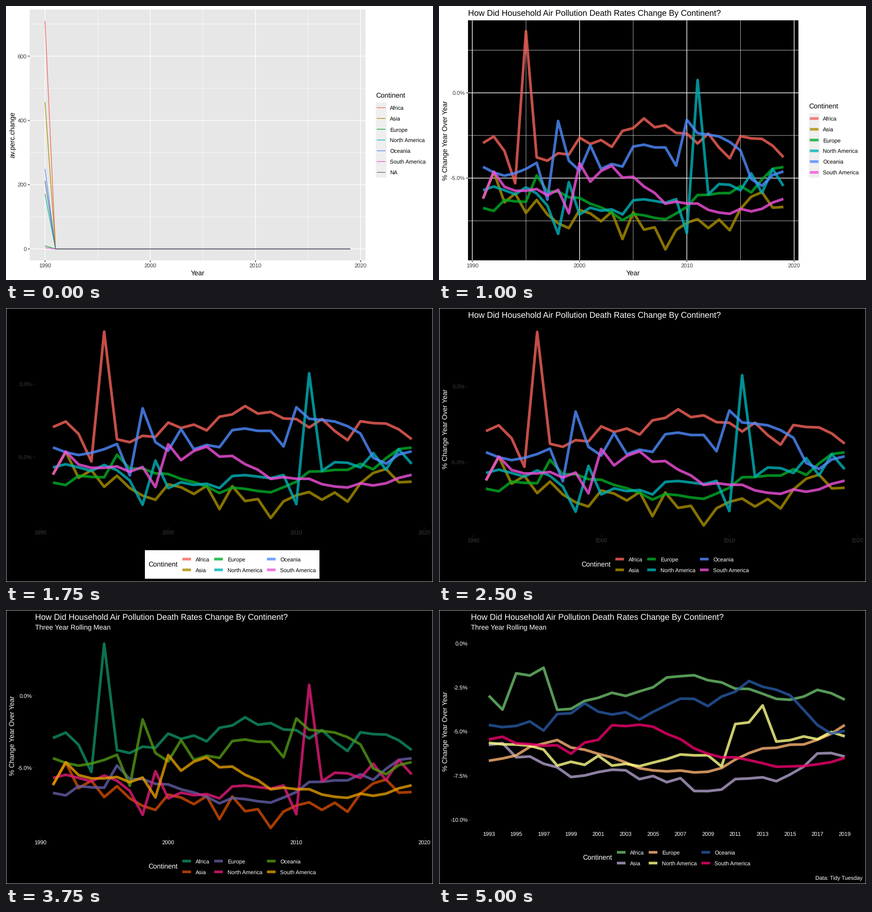
Write a matplotlib script that moves like this. It is 910 px wide and 586 px high and loops after 6500 ms.

```python
import numpy as np
import matplotlib.pyplot as plt
from matplotlib.animation import FuncAnimation
from matplotlib.patches import Rectangle

W, H, DPI = 910, 586, 64
PT = 72 / DPI                      # points per pixel
STEP, FRAMES = 250, 26
SMALL, BASE, BIG = 11.73, 14.67, 17.6
KEY = 23.04
THIN, THICK, HAIR = 1.42, 5.69, 0.71

plt.rcParams.update({
    "font.family": "Liberation Sans",
    "text.hinting": "none",
    "path.snap": False,
    "path.simplify": False,
    "toolbar": "None",
})

# Yearly change in percent, 1991 to 2019
africa = [-2.94, -2.56, -3.41, -5.3, 3.61, -3.78, -3.98, -3.54, -3.62, -2.63,
          -3.0, -2.77, -3.17, -2.23, -2.07, -1.5, -2.02, -1.9, -2.35, -2.39,
          -2.97, -2.39, -3.21, -3.84, -2.54, -2.67, -2.7, -3.1, -3.77]
asia = [-6.2, -4.64, -6.42, -5.9, -7.04, -6.28, -7.13, -7.65, -7.93, -6.87,
        -7.07, -7.53, -6.97, -8.57, -7.0, -8.02, -7.88, -9.18, -8.04, -7.62,
        -7.4, -7.93, -7.43, -8.06, -6.8, -6.09, -5.82, -6.73, -6.69]
europe = [-6.75, -6.92, -6.28, -6.36, -6.39, -4.84, -5.79, -5.79, -6.12, -6.16,
          -6.5, -6.72, -7.02, -7.47, -7.1, -7.18, -7.33, -7.42, -7.07, -6.69,
          -5.99, -5.98, -5.88, -5.88, -5.46, -5.84, -5.08, -4.45, -4.35]
north = [-5.71, -5.49, -5.71, -5.95, -5.54, -5.9, -6.61, -8.27, -5.24, -7.13,
         -6.73, -6.91, -6.83, -7.13, -6.3, -6.24, -6.34, -6.45, -6.23, -8.23,
         0.75, -5.95, -5.35, -5.39, -5.71, -4.72, -5.87, -4.47, -5.46]
oceania = [-4.34, -4.67, -4.86, -4.71, -4.46, -4.1, -6.26, -1.65, -3.98, -4.56,
           -3.08, -4.46, -4.17, -4.32, -3.15, -3.04, -3.2, -3.2, -4.27, -1.58,
           -2.37, -2.45, -2.56, -2.88, -3.38, -5.05, -5.45, -4.82, -4.61]
south = [-6.2, -4.62, -5.51, -5.74, -5.74, -5.64, -6.01, -5.68, -7.06, -4.12,
         -5.21, -4.58, -4.28, -4.97, -4.92, -5.49, -5.87, -6.5, -6.38, -6.49,
         -6.49, -6.86, -7.02, -7.09, -6.8, -6.95, -6.8, -6.43, -6.22]

NAMES = ["Africa", "Asia", "Europe", "North America", "Oceania",
         "South America", "NA"]
yearly = np.array([africa, asia, europe, north, oceania, south])
rolling = (yearly[:, :-2] + yearly[:, 1:-1] + yearly[:, 2:]) / 3
first = np.array([[710], [457], [9.5], [171], [249], [3.5], [212]])
raw = np.hstack([first, np.vstack([yearly / 100, np.zeros((1, 29))])])

HUE = "F8766D B79F00 00BA38 00BFC4 619CFF F564E3 7F7F7F"
PASTEL2 = "B3E2CD FDCDAC CBD5E8 F4CAE4 E6F5C9 FFF2AE"
PASTEL1 = "FBB4AE B3CDE3 CCEBC5 DECBE4 FED9A6 FFFFCC"
PAIRED = "A6CEE3 1F78B4 B2DF8A 33A02C FB9A99 E31A1C"
DARK2 = "1B9E77 D95F02 7570B3 E7298A 66A61E E6AB02"
ACCENT = "7FC97F BEAED4 FDC086 FFFF99 386CB0 F0027F"

# Each entry changes the settings of the plot before it
STEPS = [
    dict(data=raw, left=50.6, limits=None, lw=THIN, alpha=1, colors=HUE,
         yticks=[0, 200, 400, 600], yminor=[100, 300, 500, 700],
         label="{:.0f}".format, xticks=[1990, 2000, 2010, 2020],
         panel="EBEBEB", grid=True, page="FFFFFF", ink="000000",
         axis_ink="4D4D4D", legend_ink="000000", legend_fill="FFFFFF",
         key_fill="F2F2F2", side=True, ytitle="av.perc.change", xtitle="Year",
         title="", subtitle="", caption=""),
    dict(data=yearly, left=57.6, yticks=[-5, 0], yminor=[-7.5, -2.5, 2.5],
         label=lambda v: f"{v / 100:.2f}"),
    dict(left=61.8, label="{:.1f}%".format, lw=THICK, alpha=0.8),
    dict(title="How Did Household Air Pollution Death Rates Change "
               "By Continent?", ytitle="% Change Year Over Year"),
    dict(panel="000000"),
    dict(grid=False),
    dict(page="000000", key_fill=None),
    dict(side=False),
    dict(legend_fill="000000"),
    dict(ink="FFFFFF", legend_ink="FFFFFF"),
    dict(xtitle=""),
    dict(axis_ink="FFFFFF"),
    dict(subtitle="Three Year Rolling Mean", colors=PASTEL2),
    dict(colors=PASTEL1),
    dict(colors=PAIRED),
    dict(colors=DARK2),
    dict(colors=ACCENT),
    dict(data=rolling, yticks=[-8, -6, -4, -2]),
    dict(left=68.2, limits=(-10, 0), yticks=[-10, -7.5, -5, -2.5, 0]),
    dict(xticks=range(1993, 2020, 2)),
    dict(caption="Data: Tidy Tuesday"),
]

fig = plt.figure(figsize=(W / DPI, H / DPI), dpi=DPI)
ax = fig.add_axes([0, 0, 1, 1])


def tone(code):
    """Hex colour as shown on a slightly darker display curve."""
    return tuple((int(code[i:i + 2], 16) / 255) ** 1.222 for i in (0, 2, 4))


def box(x0, y0, x1, y1, color):
    ax.add_patch(Rectangle((x0, y0), x1 - x0, y1 - y0, fc=color, lw=0))


def line(x, y, color, width, alpha=1):
    ax.plot(x, y, color=color, lw=width * PT, alpha=alpha,
            solid_capstyle="butt", solid_joinstyle="round")


def text(x, y, s, size, color, ha="left", rotation=0):
    ax.text(x, y, s, size=size * PT, color=color, ha=ha, va="baseline",
            rotation=rotation, rotation_mode="anchor")


def scale(lo, hi, start, end):
    """Map data to pixels with 5 % of room on both ends."""
    pad = 0.05 * (hi - lo)
    return lambda v: (start + (np.asarray(v) - lo + pad)
                      / (hi - lo + 2 * pad) * (end - start))


def legend_item(s, x, y, name, color):
    if s["key_fill"]:
        box(x, y - KEY / 2, x + KEY, y + KEY / 2, tone(s["key_fill"]))
    line([x + 0.1 * KEY, x + 0.9 * KEY], [y, y], color, s["lw"], s["alpha"])
    text(x + KEY + 7.2, y + 4.5, name, SMALL, tone(s["legend_ink"]))


def draw_side_legend(s, colors, middle):
    n = len(s["data"])
    top = middle - (n * KEY + 21.9) / 2
    box(780.6, top - 7.3, 902.7, 2 * middle - top + 7.3,
        tone(s["legend_fill"]))
    text(788, top + 12.9, "Continent", BASE, tone(s["legend_ink"]))
    for i in range(n):
        legend_item(s, 788, top + 33.4 + i * KEY, NAMES[i], colors[i])


def draw_bottom_legend(s, colors):
    x = 296 + (s["left"] - 61.8) / 2
    y = 499.2 if s["caption"] else 518
    box(x, y, x + 372, y + 61, tone(s["legend_fill"]))
    text(x + 7.3, y + 36, "Continent", BASE, tone(s["legend_ink"]))
    for i in range(6):
        col, row = divmod(i, 2)
        legend_item(s, x + (77.6, 145.4, 257.8)[col], y + 19 + row * KEY,
                    NAMES[i], colors[i])


def draw_axes(s, px, py, left, right, top, bottom):
    if s["grid"]:
        for v in (1995, 2005, 2015):
            line([px(v)] * 2, [top, bottom], "white", HAIR)
        for v in s["yminor"]:
            line([left, right], [py(v)] * 2, "white", HAIR)
    ink, tick = tone(s["axis_ink"]), tone("333333")
    for v in s["xticks"]:
        x = px(v)
        if not left < x < right:
            continue
        if s["grid"]:
            line([x, x], [top, bottom], "white", THIN)
        line([x, x], [bottom, bottom + 3.67], tick, THIN)
        text(x, bottom + 15.2, str(v), SMALL, ink, "center")
    for v in s["yticks"]:
        y = py(v)
        if s["grid"]:
            line([left, right], [y, y], "white", THIN)
        line([left - 3.67, left], [y, y], tick, THIN)
        text(left - 6.6, y + 4.2, s["label"](v), SMALL, ink, "right")


def draw(frame):
    s = {}
    for step in STEPS[:frame + 1]:
        s.update(step)

    ax.clear()
    ax.axis("off")
    ax.set(xlim=(0, W), ylim=(H, 0))
    ax.add_patch(Rectangle((0, 0), W, H, fc=tone(s["page"]), ec="white",
                           lw=THIN * PT))

    left, right = s["left"], 766 if s["side"] else 902.7
    top = 52.3 if s["subtitle"] else 30.6 if s["title"] else 7.3
    if s["side"]:
        bottom = 544
    elif s["xtitle"]:
        bottom = 469
    else:
        bottom = 467.9 if s["caption"] else 485.8
    middle = (top + bottom) / 2

    data = s["data"]
    years = np.arange(2020 - data.shape[1], 2020)
    lo, hi = s["limits"] or (data.min(), data.max())
    px = scale(years[0], years[-1], left, right)
    py = scale(lo, hi, bottom, top)
    colors = [tone(c) for c in s["colors"].split()]

    box(left, top, right, bottom, tone(s["panel"]))
    draw_axes(s, px, py, left, right, top, bottom)
    for row, color in zip(data, colors):
        line(px(years), py(row), color, s["lw"], s["alpha"])

    ink = tone(s["ink"])
    text(left, 20.1, s["title"], BIG, ink)
    text(left, 42.1, s["subtitle"], BASE, ink)
    text(18.2, middle, s["ytitle"], BASE, ink, "center", 90)
    text((left + right) / 2, bottom + 32.3, s["xtitle"], BASE, ink, "center")
    text(902.7, 577.2, s["caption"], SMALL, ink, "right")

    if s["side"]:
        draw_side_legend(s, colors, middle)
    else:
        draw_bottom_legend(s, colors)


anim = FuncAnimation(fig, draw, frames=FRAMES, interval=STEP, repeat=True,
                     repeat_delay=0)
plt.show()
```
